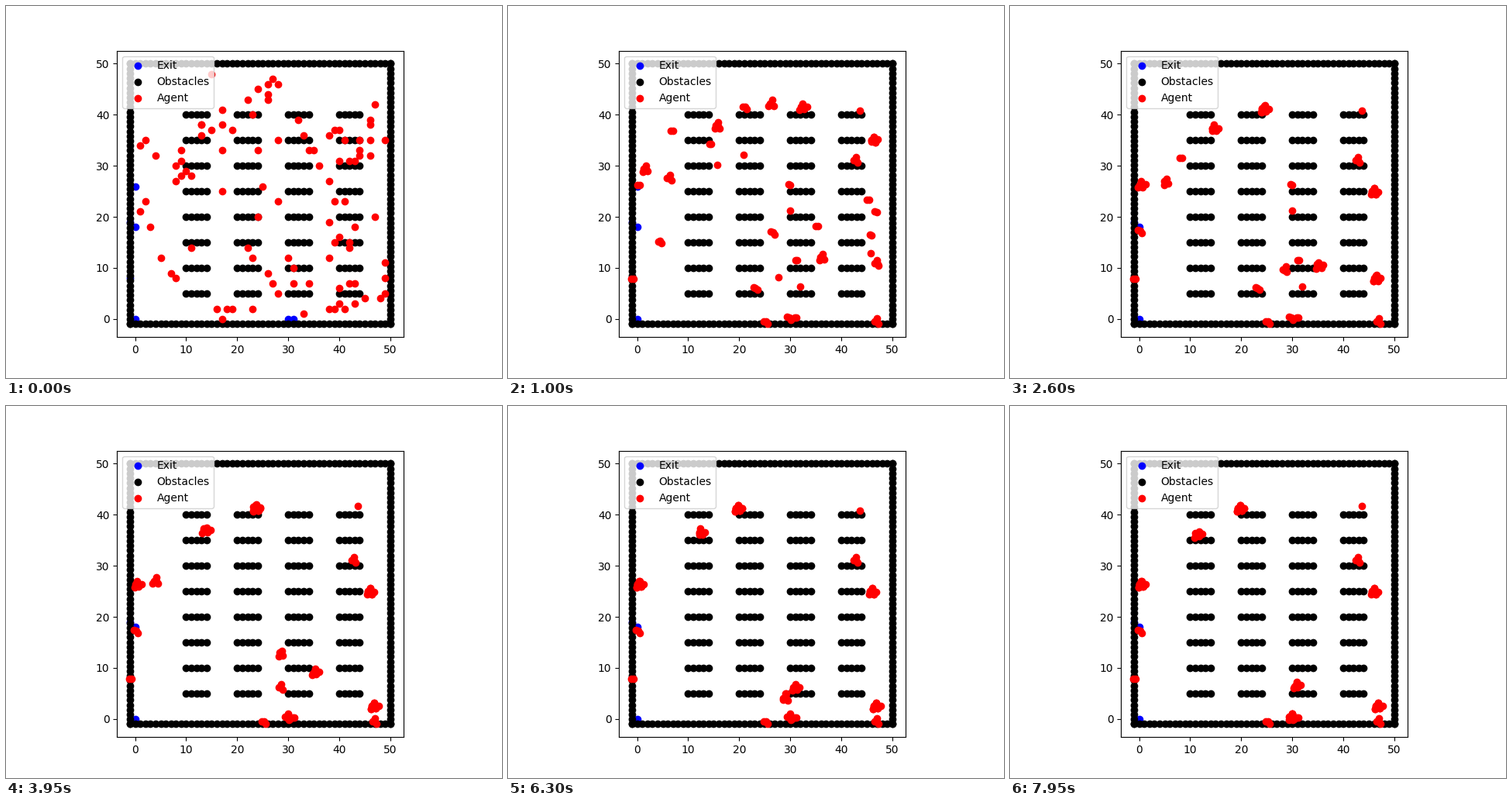
These frames come from a looping animation (640 px wide and 480 px high, 8000 ms). A matplotlib script:

```python
import numpy as np
import matplotlib.pyplot as plt
from matplotlib.animation import FuncAnimation

FRAMES, INTERVAL = 160, 50
MEET = 20         # frame at which scattered agents have formed flocks
REACH = 9         # how far from its flock an agent may start
SPEED = 0.5       # units per frame when hurrying
DRIFT = 3.5       # shorter legs are walked slowly
rng = np.random.default_rng(4)

cells = np.array([(x, y) for x in range(50) for y in range(50)])
time = np.arange(FRAMES)
tracks = []


def packed(k):
    """Offset of member k in a tight spiral of at most six places."""
    k = k % 6
    angle = 0.6 + 2.4 * k
    return 0.38 * np.sqrt(k) * np.array([np.cos(angle), np.sin(angle)])


def walk(knots):
    """Positions for every frame; long legs are hurried, then the agent waits."""
    f, p = knots[0]
    frames, points = [f], [p]
    for f1, p1 in knots[1:]:
        dist = np.hypot(*(p1 - p))
        if dist > DRIFT and f + dist / SPEED < f1:
            frames.append(f + dist / SPEED)
            points.append(p1)
        frames.append(f1)
        points.append(p1)
        f, p = f1, p1
    x, y = np.transpose(points)
    return np.column_stack([np.interp(time, frames, x), np.interp(time, frames, y)])


def herd(flocks, path=(), leave=MEET):
    """Flocks (size, x, y) gather, wait, then merge and follow path (frame, x, y)."""
    member = 0
    for size, *centre in flocks:
        near = cells[np.hypot(*(cells - centre).T) < REACH]
        for k, start in enumerate(rng.choice(near, size, replace=False)):
            meet = centre + packed(k)
            knots = [(0, start), (MEET, meet), (leave, meet)]
            knots += [(f, np.array(xy) + packed(member)) for f, *xy in path]
            tracks.append(walk(knots))
            member += 1


# A loner at the top right, stepping up and down
herd([(1, 43.6, 40.8)])
tracks[0][MEET + 1::2, 1] += 0.9

# Left exits
herd([(5, 1.7, 29.4), (2, .5, 26.2)], [(52, .4, 26.3)])
herd([(4, 6.4, 27.5), (1, 15.7, 30.2)], [(52, 5.4, 26.8), (79, 4.1, 27), (98, .5, 26.3)])
herd([(2, 7, 36.8)], [(52, 8.4, 31.5), (79, 4.1, 27), (98, .5, 26.3)])
herd([(3, 4.5, 15.3)], [(52, .2, 17.3)])
herd([(2, -.7, 7.8)])

# Top
herd([(5, 15.8, 37.8), (2, 14.5, 34.2), (1, 20.9, 32.1)],
     [(52, 14.7, 37.3), (159, 11.5, 36.2)])
herd([(3, 21.1, 41.5), (5, 26.3, 42.2), (7, 32.4, 41.5)],
     [(52, 24.4, 41.1), (98, 23.3, 41.5), (159, 19.7, 41.2)])

# Right side
herd([(10, 46.3, 35)], [(159, 46, 24.9)])
herd([(4, 42.8, 31.1)])
herd([(2, 45.4, 23.3), (2, 47, 20.9), (2, 45.9, 16.4), (1, 45.8, 12.9), (4, 46.9, 10.8)],
     [(52, 46.4, 8), (159, 46.8, 2.5)])
herd([(4, 46.9, -.5)])

# Middle and bottom exits
herd([(5, 36.3, 12.1), (2, 35.4, 18.2)],
     [(52, 35.2, 10.5), (79, 35.2, 9.1), (126, 31, 6.1), (159, 30.8, 6.5)])
herd([(1, 30, 21.2), (2, 30, 26.3), (2, 31.4, 11.5)],
     [(79, 28.6, 12.9), (98, 28.9, 7.2), (126, 29.1, 4.2), (159, 29.9, .4)], leave=52)
herd([(1, 31.9, 6.4), (3, 23.2, 6.1)],
     [(79, 28.5, 6.2), (126, 29.1, 4.2), (159, 29.9, .4)], leave=52)
herd([(3, 26.6, 17), (1, 27.7, 8.2)], [(52, 28.5, 9.6), (79, 29.9, .4)])
herd([(3, 29.8, .3), (2, 31.2, .2)])
herd([(3, 25.2, -.5)])

# Slowly drifting agents shake from side to side
tracks = np.array(tracks).swapaxes(0, 1)
step = np.linalg.norm(np.diff(tracks, axis=0, prepend=tracks[:1]), axis=2)
shaking = (step > 0.005) & (step < 0.18)
side = (-1.0) ** time
shake = rng.uniform(-.2, .2, tracks[0].shape)
tracks += shake * side[:, None, None] * shaking[..., None]

row = np.arange(-1, 51)
column = np.linspace(-1, 50, 55)
walls = [(x, y) for y in (-1, 50) for x in row] + [(x, y) for x in (-1, 50) for y in column]
shelves = [(x + d, y) for x in (10, 20, 30, 40) for y in range(5, 41, 5) for d in range(5)]
exits = [(0, 0), (0, 18), (0, 26), (30, 0), (31, 0), (-1, 8), (-1, 19)]

fig, ax = plt.subplots(figsize=(6.4, 4.8), dpi=100)
ax.set_aspect("equal")
ax.scatter(*zip(*exits), color="blue", label="Exit")
ax.scatter(*zip(*(walls + shelves)), color="black", label="Obstacles")
agents = ax.scatter(*tracks[0].T, color="red", label="Agent")
ax.set_xlim(-3.55, 52.55)
ax.set_ylim(-3.55, 52.55)
ax.set_xticks(range(0, 51, 10))
ax.set_yticks(range(0, 51, 10))
ax.legend(loc="upper left")


def update(i):
    agents.set_offsets(tracks[i])
    return agents,


anim = FuncAnimation(fig, update, frames=FRAMES, interval=INTERVAL,
                     repeat=True, repeat_delay=0)
plt.show()
```
